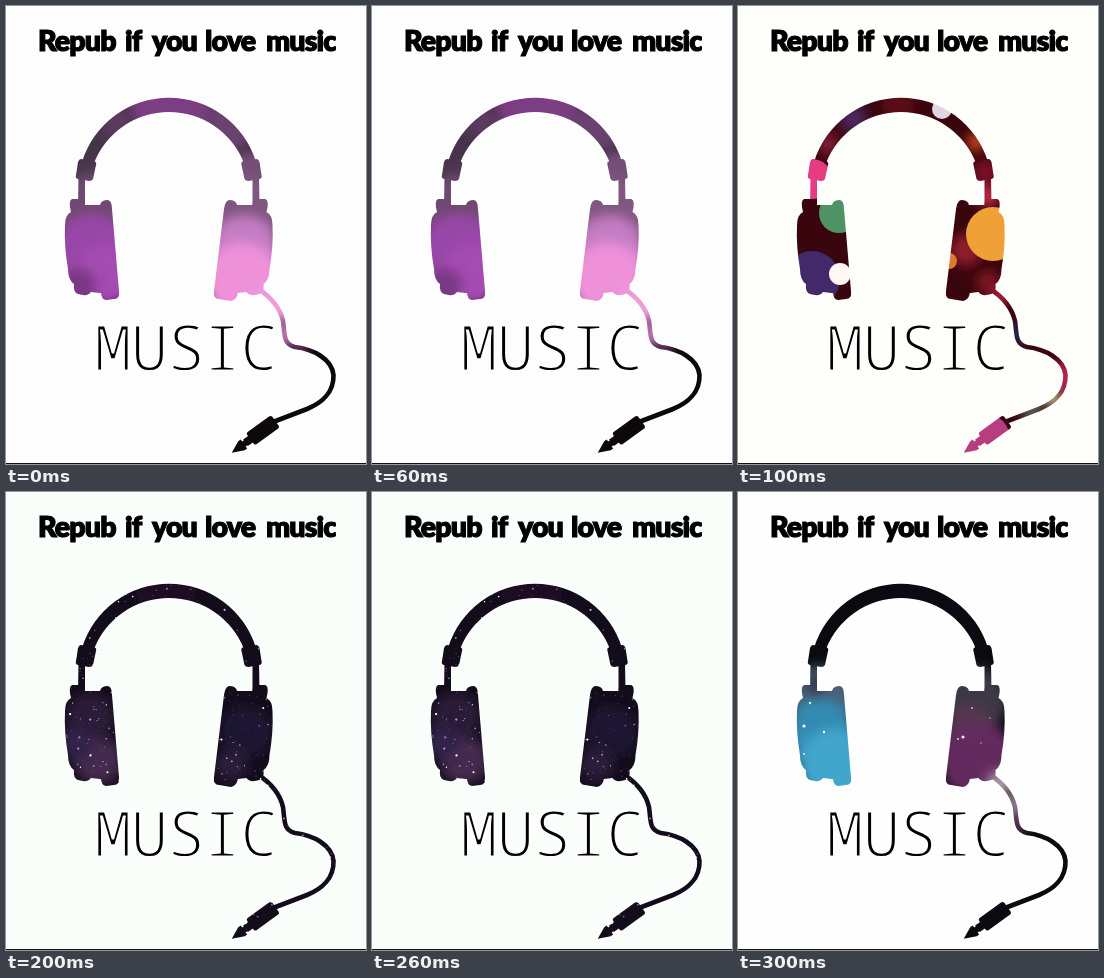
An HTML page that plays this animation: 360x458 px, repeating every 0.4 s.

```html
<!DOCTYPE html>
<html lang="en">
<head>
<meta charset="utf-8">
<title>Music headphones</title>
<style>
  html, body { margin: 0; width: 100%; height: 100%; overflow: hidden; background: #fdfdfd; }
  svg { display: block; width: 360px; height: 458px; }
  .caption { font: 900 28.5px Lato, sans-serif; letter-spacing: -.9px; stroke: #000; stroke-width: 1px; }
  /* A paper-coloured outline thins the strokes of the letters. */
  .word { font: 64px "Noto Sans Mono", monospace; letter-spacing: -1.9px; stroke: #fdfefc; stroke-width: 2.8px; }
</style>
</head>
<body>
<svg viewBox="0 0 360 458">
  <defs>
    <filter id="soft" x="-100%" y="-100%" width="300%" height="300%"><feGaussianBlur stdDeviation="6"/></filter>
    <clipPath id="captionEdge"><rect width="329.5" height="60"/></clipPath>
    <g id="shell">
      <path d="M75 153L88 155Q91 156 90 159L87 173Q86 175 83 175L72 173Q69 172 70 169L72 156Q73 153 75 153Z"/>
      <path d="M72.5 171H79V199H72Z"/>
      <path d="M66 193H76Q79 194 79 199L98 199L102 288L85 286Q82 291 72 288Q67 286 68 278Q62 274 62 263Q58 240 59 219Q59 209 65 206Q62 195 66 193Z"/>
    </g>
    <mask id="headphones" maskUnits="userSpaceOnUse" x="0" y="0" width="360" height="458">
      <g fill="#fff">
        <path d="M76 156A91 91 0 0 1 250 156L238 157A80.6 80.6 0 0 0 88 157Z"/>
        <use href="#shell"/>
        <use href="#shell" transform="matrix(-1 0 0 1 325.5 0)"/>
        <path d="M94 199Q95 194 102 194Q106 195 106 203L113 285Q114 293 108 293L100 294Q95 293 95 286Z"/>
        <path d="M231 199Q230 194 223 194Q219 195 218 203L208 285Q207 293 213 293L225 295Q231 294 232 286Z"/>
        <path fill="none" stroke="#fff" stroke-width="4.6" d="M251 282C265 291 274 302 277 315C279 329 277 338 289 341C307 343 326 353 327.5 369C328 386 316 397 301 403L267 416"/>
        <g transform="translate(256.5 424.5) rotate(-36)">
          <rect x="-15" y="-7.5" width="31" height="15" rx="2.5"/>
          <path d="M-14 -4H-21V-3H-23V-5.5H-26L-38 0L-26 5.5H-23V3H-21V4H-14Z"/>
        </g>
      </g>
    </mask>
  </defs>
  <g id="scenes"></g>
  <text class="word" x="87.8" y="365.4">MUSIC</text>
  <g class="caption" clip-path="url(#captionEdge)">
    <text y="45"><tspan x="32">Repub</tspan> <tspan x="119">if</tspan> <tspan x="146">you</tspan> <tspan x="199">love</tspan> <tspan x="260">music</tspan></text>
  </g>
  <rect y="457" width="360" height="1" fill="#111"/>
</svg>
<script>
const STEP = 100;
const svgNS = "http://www.w3.org/2000/svg";

// Each spot is [x, y, radius, colour]; hard spots keep a crisp edge.
const scenes = [
  {
    paper: "#fdfdfd", base: "#0c080c",
    soft: [
      [88, 140, 32, "#45364a"], [165, 98, 46, "#7d3c82"], [112, 115, 18, "#5b3a60"], [225, 120, 28, "#694370"],
      [80, 165, 18, "#48354c"], [247, 168, 26, "#755078"],
      [84, 204, 36, "#6f4a72"], [86, 250, 42, "#9847a8"], [100, 268, 30, "#a54bb2"], [72, 280, 18, "#793884"],
      [238, 208, 38, "#805680"], [238, 245, 36, "#c47bc3"], [236, 274, 38, "#ee91d9"],
      [268, 300, 20, "#ef9edc"], [279, 328, 14, "#bb72b2"], [294, 342, 8, "#6f3a6c"]
    ]
  },
  {
    paper: "#fefefb", base: "#39060d",
    soft: [
      [115, 113, 14, "#4b2860"], [160, 98, 16, "#5c0b18"], [90, 138, 11, "#811a36"],
      [238, 136, 9, "#d44a24"], [248, 167, 13, "#7d1027"], [250, 190, 11, "#c22c4a"],
      [228, 244, 16, "#901f2b"], [250, 276, 12, "#7c1322"],
      [262, 290, 10, "#b3203a"], [280, 328, 12, "#29204a"], [327, 371, 16, "#b52452"],
      [314, 392, 9, "#d5d09a"], [294, 405, 11, "#58615a"]
    ],
    hard: [
      [74, 173, 20, "#e63c81"], [204, 103, 10, "#e0d6e2"],
      [101, 207, 20, "#4f9364"], [74, 273, 28, "#44296a"], [102, 268, 11, "#fff8f2"],
      [211, 255, 8, "#dc7a35"], [255, 228, 27, "#efa137"], [246, 433, 26, "#b63d80"]
    ]
  },
  {
    paper: "#fafefb", base: "#130d1b",
    soft: [
      [84, 225, 24, "#291b38"], [92, 268, 24, "#45294f"], [70, 250, 16, "#30204b"],
      [240, 240, 26, "#1d1433"], [225, 272, 17, "#2b1a3a"], [160, 98, 30, "#1b1124"]
    ],
    stars: 1200
  },
  {
    paper: "#fdfefd", base: "#0a0a10",
    soft: [
      [84, 206, 32, "#4c6179"], [82, 240, 34, "#328bb0"], [96, 272, 36, "#43a5cc"], [78, 192, 10, "#303444"],
      [238, 207, 32, "#3c3744"], [232, 236, 24, "#55394f"], [240, 268, 38, "#642a5f"],
      [262, 292, 13, "#a89aa6"], [278, 313, 15, "#89778a"], [281, 332, 9, "#643b62"]
    ],
    hard: [
      [66, 234, 1.6, "#fff"], [72, 211, 1.2, "#d8f3ff"], [86, 240, 1.2, "#fff"],
      [66, 262, 1, "#d8f3ff"], [225, 245, 1.6, "#eee"], [220, 247, 1, "#ddd"],
      [234, 216, .9, "#ccc"], [252, 226, .8, "#bbb"], [243, 251, .8, "#c9a9c8"]
    ]
  }
];

function add(parent, tag, attributes = {}) {
  const node = document.createElementNS(svgNS, tag);
  for (const [key, value] of Object.entries(attributes)) node.setAttribute(key, value);
  return parent.appendChild(node);
}

function spot(parent, [cx, cy, r, fill]) {
  return add(parent, "circle", { cx, cy, r, fill });
}

function seeded(seed) {
  return () => (seed = seed * 16807 % 2147483647) / 2147483647;
}

function scatterStars(parent, count) {
  const random = seeded(731);
  const tints = ["#fff", "#c8a8df", "#7f84cf", "#bd7094", "#796092"];
  for (let i = 0; i < count; i++) {
    const tint = tints[Math.floor(random() * tints.length)];
    spot(parent, [58 + random() * 272, 92 + random() * 350, .35 + random() ** 3 * .8, tint]);
  }
}

scenes.forEach((scene, index) => {
  const group = add(document.getElementById("scenes"), "g");
  add(group, "rect", { width: 360, height: 458, fill: scene.paper });
  const art = add(group, "g", { mask: "url(#headphones)" });
  add(art, "rect", { width: 360, height: 458, fill: scene.base });
  for (const item of scene.soft) spot(art, item).setAttribute("filter", "url(#soft)");
  for (const item of scene.hard || []) spot(art, item);
  scatterStars(art, scene.stars || 0);

  const count = scenes.length;
  const frames = scenes.map((_, i) => ({
    opacity: i === index ? 1 : 0, offset: i / count, easing: "step-end"
  }));
  frames.push({ opacity: index === count - 1 ? 1 : 0, offset: 1 });
  group.animate(frames, { duration: STEP * count, iterations: Infinity });
});
</script>
</body>
</html>
```
